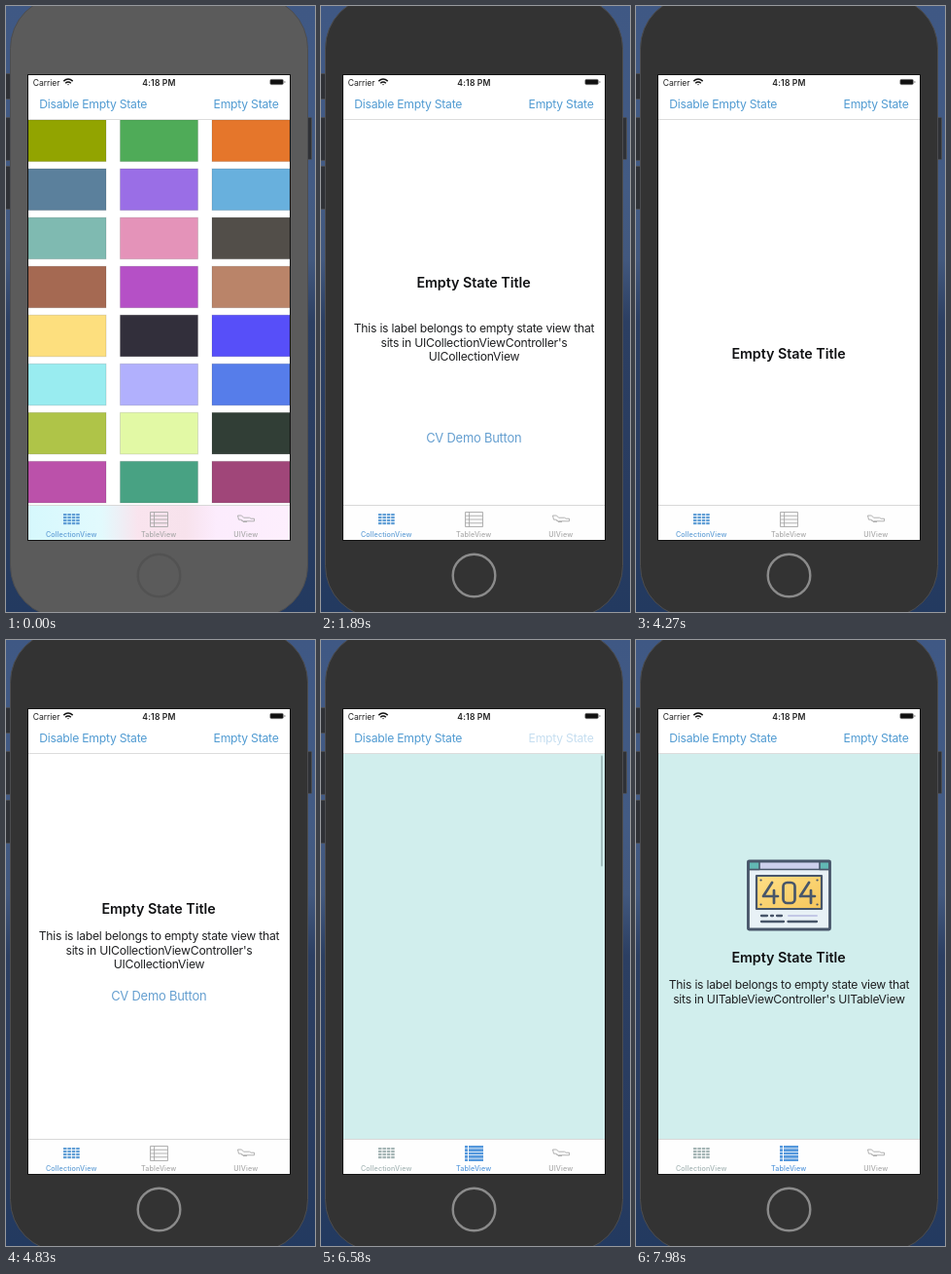
These frames come from a looping animation (318x622 px, 8 s). An HTML page:

```html
<!DOCTYPE html>
<html lang="en">
<head>
<meta charset="utf-8">
<title>Empty state demo</title>
<style>
html, body { margin: 0; width: 100%; height: 100%; overflow: hidden; background: #33486e; }
svg { display: block; width: 100vw; height: 100vh; }
text { font-family: Inter, Roboto, "Liberation Sans", sans-serif; white-space: pre; }
.body { font-size: 12.2px; letter-spacing: -.25px; fill: #1f2022; }
.title { font-size: 14.3px; font-weight: 600; letter-spacing: -.04px; fill: #101113; }
.link { font-size: 12.2px; letter-spacing: -.25px; fill: #519bd2; }
.demo { font-size: 12.9px; letter-spacing: -.2px; fill: #659fd0; }
.status { font-size: 8.6px; letter-spacing: -.08px; fill: #222; }
.clock { font-weight: 600; letter-spacing: .15px; }
.tab { font-size: 7.2px; font-weight: 500; letter-spacing: .1px; fill: currentColor; }
.mid { text-anchor: middle; }
.icon { fill: none; stroke: currentColor; }
</style>
</head>
<body>
<svg viewBox="0 0 318 622" preserveAspectRatio="none">
  <defs>
    <linearGradient id="sky" x2="0" y2="1">
      <stop offset="0" stop-color="#3f5884"/>
      <stop offset=".3" stop-color="#435b84"/>
      <stop offset=".42" stop-color="#42587e"/>
      <stop offset=".52" stop-color="#2c3f62"/>
      <stop offset=".8" stop-color="#293c60"/>
      <stop offset="1" stop-color="#233a60"/>
    </linearGradient>
    <linearGradient id="tintA">
      <stop offset="0" stop-color="#d6f8fd"/>
      <stop offset=".28" stop-color="#e2fafd"/>
      <stop offset=".42" stop-color="#f9e4ee"/>
      <stop offset=".6" stop-color="#f7e2ec"/>
      <stop offset=".72" stop-color="#fcecfd"/>
      <stop offset="1" stop-color="#fdeffd"/>
    </linearGradient>
    <linearGradient id="tintB">
      <stop offset="0" stop-color="#e6fbfc"/>
      <stop offset=".3" stop-color="#f2fdfd"/>
      <stop offset=".36" stop-color="#fff"/>
      <stop offset=".64" stop-color="#fff"/>
      <stop offset=".72" stop-color="#f3e6f5"/>
      <stop offset="1" stop-color="#f5eaf6"/>
    </linearGradient>
    <linearGradient id="sign" x2="1" y2="1">
      <stop offset="0" stop-color="#ffdf86"/>
      <stop offset="1" stop-color="#f5c65c"/>
    </linearGradient>
    <clipPath id="view"><rect x="23" y="116" width="269" height="397"/></clipPath>
  </defs>

  <rect width="318" height="622" fill="url(#sky)"/>
  <g fill="#2f3136" stroke="#4b4d52">
    <rect x="-.5" y="69.5" width="6" height="26" rx="1"/>
    <rect x="-.5" y="114.5" width="6" height="44" rx="1"/>
    <rect x="-.5" y="164.5" width="6" height="44" rx="1"/>
    <rect x="309.5" y="114.5" width="5" height="43" rx="1"/>
  </g>
  <rect id="shell" x="4.5" y="-9.5" width="306" height="637" rx="53" stroke="#4c4d50"/>
  <circle id="home" cx="157.5" cy="584.5" r="21.8" fill="none" stroke-width="2.4"/>

  <rect x="22" y="70" width="271" height="479" fill="#151515"/>
  <rect x="23" y="71" width="269" height="477" fill="#fff"/>

  <g clip-path="url(#view)">
    <g id="grid"></g>
    <g id="table">
      <rect x="23" y="116" width="269" height="397" fill="#d1eeed"/>
      <rect id="bar" x="288" y="118.5" width="2" height="114" rx="1" fill="#a3bebe"/>
    </g>
    <g id="cvEmpty" class="mid">
      <g><text class="title" x="157" y="280.5">Empty State Title</text></g>
      <g class="body">
        <text x="157.5" y="308">This is label belongs to empty state view that</text>
        <text x="157.5" y="322.5">sits in UICollectionViewController's</text>
        <text x="157.5" y="337">UICollectionView</text>
      </g>
      <g><text class="link demo" x="157.3" y="370">CV Demo Button</text></g>
    </g>
    <g id="tvEmpty" class="mid">
      <g stroke="#48566a" stroke-linecap="round" stroke-linejoin="round">
        <rect x="115.5" y="227" width="84" height="70" fill="#e8f1f6"/>
        <path d="M115.5 227h84v8.5h-84z" fill="#cdd0ec" stroke-width="1.6"/>
        <path d="M116 227h11v8.5h-11zM189 227h10v8.5h-10z" fill="#62b8b4" stroke-width="1.6"/>
        <rect x="115.5" y="227" width="84" height="70" rx="1" fill="none" stroke-width="2.8"/>
        <rect x="124" y="242" width="67" height="34" fill="url(#sign)" stroke-width="2.2"/>
        <path d="M140 249l-9 14h15M142 257v13M169 263h15M180 257v13M178 249l-9 14" fill="none" stroke-width="2.7"/>
        <rect x="151.5" y="249" width="12" height="21" rx="4" fill="none" stroke-width="2.7"/>
        <path d="M128.5 246.5h.1M128.5 271.5h.1M186.5 246.5h.1M186.5 271.5h.1" stroke-width="2.2"/>
        <path d="M129 283h6M139 283h2M145 283h5M129 289h23M156.5 289h29.5" stroke-width="2.3"/>
        <path d="M157 283h29" stroke="#c3c8e6" stroke-width="2"/>
      </g>
      <g><text class="title" x="157" y="330.8">Empty State Title</text></g>
      <g class="body">
        <text x="157.5" y="358">This is label belongs to empty state view that</text>
        <text x="157.5" y="372.5">sits in UITableViewController's UITableView</text>
      </g>
    </g>
  </g>

  <!-- status and navigation bars -->
  <text class="status" x="27.8" y="81.5">Carrier</text>
  <g fill="none" stroke="#111" stroke-width="1.5">
    <path d="M59.3 77.1q4.7-4.2 9.4 0M61.2 79.2q2.8-2.5 5.6 0"/>
    <path d="M63 80.2h2l-1 1.3z" fill="#111" stroke="none"/>
  </g>
  <text class="status clock mid" x="157.5" y="81.5">4:18 PM</text>
  <rect x="271.8" y="75.3" width="13.6" height="5.4" rx="1.4" fill="#111" stroke="#888" stroke-width=".6"/>
  <rect x="286.4" y="77" width="1" height="2" rx=".5" fill="#888"/>
  <text id="disable" class="link" x="34.3" y="105.4">Disable Empty State</text>
  <text id="enable" class="link" x="280.5" y="105.4" text-anchor="end">Empty State</text>
  <path d="M23 116.5h269" stroke="#dcdcdc"/>

  <!-- tab bar -->
  <rect x="23" y="513" width="269" height="35" fill="#fefefe"/>
  <rect id="tint" x="23" y="513" width="269" height="35"/>
  <path d="M23 512.5h269" stroke="#d8d8d8"/>
  <g id="tabCV">
    <g id="dots" fill="currentColor"></g>
    <text class="tab mid" x="67.2" y="545">CollectionView</text>
  </g>
  <g id="tabTV">
    <path id="listLine" class="icon" d="M148.5 519.5h18v15h-18zM148.5 523.25h18M148.5 527h18M148.5 530.75h18M152.5 519.5v15" stroke-width=".9"/>
    <path id="listFill" class="icon" d="M148 520.2h3M152 520.2h15M148 523.6h3M152 523.6h15M148 527h3M152 527h15M148 530.4h3M152 530.4h15M148 533.8h3M152 533.8h15" stroke-width="2.6"/>
    <text class="tab mid" x="157.2" y="545">TableView</text>
  </g>
  <g color="#a9a9a9">
    <path class="icon" d="M238.5 523h4l2 2.2h6l1.5 1h3.5v2.6h-11l-3-1.6h-2zM242 527.5l2 2h4" stroke-width=".9"/>
    <text class="tab mid" x="246.8" y="545">UIView</text>
  </g>
</svg>
<script>
const LOOP = 8000, STEP = 70, NS = "http://www.w3.org/2000/svg";
const $ = id => document.getElementById(id);
const clamp = v => Math.max(0, Math.min(1, v));
const ramp = (t, a, b) => clamp((t - a) / (b - a));
const show = (id, on) => $(id).style.display = on ? "" : "none";

const first = ("92a400 4fab58 e5762b 5b809c 9a6ee6 68b0dd 7fbab1 e493b9 524e49 a56952 b550c6 ba8469 " +
  "fddf7e 322f3b 574ff9 99ecf0 b1b0fd 567dea afc448 e2f9a5 313e36 bb51aa 48a283 a04679").split(" ");
const second = ("7f9290 9b93f5 4a65bd 782e55 98d0ce cb8e20 653668 a05574 efcf91 9f7f7f fddfd0 63c9ae " +
  "966ba0 5a78fd 5a61f8 dd51a6 66fdb9 eb7820 865446 b0c4f2 eb4b1a 7ada9b f8729a e2c9bf").split(" ");
const third = [...second].reverse();

function addRect(parent, x, y, width, height) {
  const r = document.createElementNS(NS, "rect");
  Object.entries({ x, y, width, height }).forEach(([k, v]) => r.setAttribute(k, v));
  parent.append(r);
  return r;
}

const cells = first.map((_, i) => {
  const r = addRect($("grid"), 23 + i % 3 * 94.5, 117 + Math.floor(i / 3) * 50.05, 80, 42.6);
  r.setAttribute("stroke", "#000");
  r.setAttribute("stroke-opacity", ".12");
  return r;
});
for (let i = 0; i < 16; i++) addRect($("dots"), 59 + i % 4 * 4.4, 521 + Math.floor(i / 4) * 3, 3.5, 2.2);

// Bar button opacity while tapped
function tapped(t, taps) {
  return Math.min(...taps.map(at => 1 - .68 * ramp(t, at, at + 140) * (1 - ramp(t, at + 280, at + 490))));
}

// Rows rise one after another on a critically damped spring
function rise(id, t) {
  [...$(id).children].forEach((row, i) => {
    const x = Math.max(0, t - i * 68.8) * .0188;
    row.setAttribute("transform", `translate(0 ${800 * (1 + x) * Math.exp(-x)})`);
  });
}

function leave(id, p) {
  const s = 1 - p;
  $(id).setAttribute("transform", `translate(157.5 313) scale(${s}) translate(-157.5 -313)`);
  $(id).setAttribute("opacity", s);
}

const visits = [[1544, 2955], [4064, 5125]];
const TABLE = 6300, TABLE_EMPTY = 6560;

function draw(t) {
  const active = ramp(t, 520, 770);
  const mix = (a, b) => { const v = Math.round(a + (b - a) * active); return `rgb(${v},${v},${v})`; };
  $("shell").setAttribute("fill", mix(91, 51));
  $("home").setAttribute("stroke", mix(82, 139));

  const table = t >= TABLE;
  const visit = visits.find(([a, b]) => t >= a && t < b + 350);
  const grid = !table && !visits.some(([a, b]) => t >= a && t < b);
  const palette = t < 2000 ? first : t < 4500 ? second : third;
  show("grid", grid);
  cells.forEach((c, i) => c.setAttribute("fill", "#" + palette[i]));
  show("tint", grid);
  $("tint").setAttribute("fill", palette === first ? "url(#tintA)" : "url(#tintB)");

  show("cvEmpty", visit);
  if (visit) {
    rise("cvEmpty", t - visit[0]);
    leave("cvEmpty", ramp(t, visit[1], visit[1] + 350));
  }

  show("table", table);
  show("tvEmpty", t >= TABLE_EMPTY);
  rise("tvEmpty", t - TABLE_EMPTY);
  $("bar").setAttribute("opacity", 1 - ramp(t, 6700, 7000));

  $("disable").setAttribute("opacity", tapped(t, [2730, 4900]));
  $("enable").setAttribute("opacity", tapped(t, [1200, 3720, 6340]));

  $("tabCV").setAttribute("color", table ? "#a5b5b5" : "#629fd6");
  $("tabTV").setAttribute("color", table ? "#5598dc" : "#a9a9a9");
  show("listLine", !table);
  show("listFill", table);
}

function tick() {
  const t = performance.now() % LOOP;
  draw(Math.floor(t / STEP) * STEP);
  requestAnimationFrame(tick);
}
tick();
</script>
</body>
</html>
```
